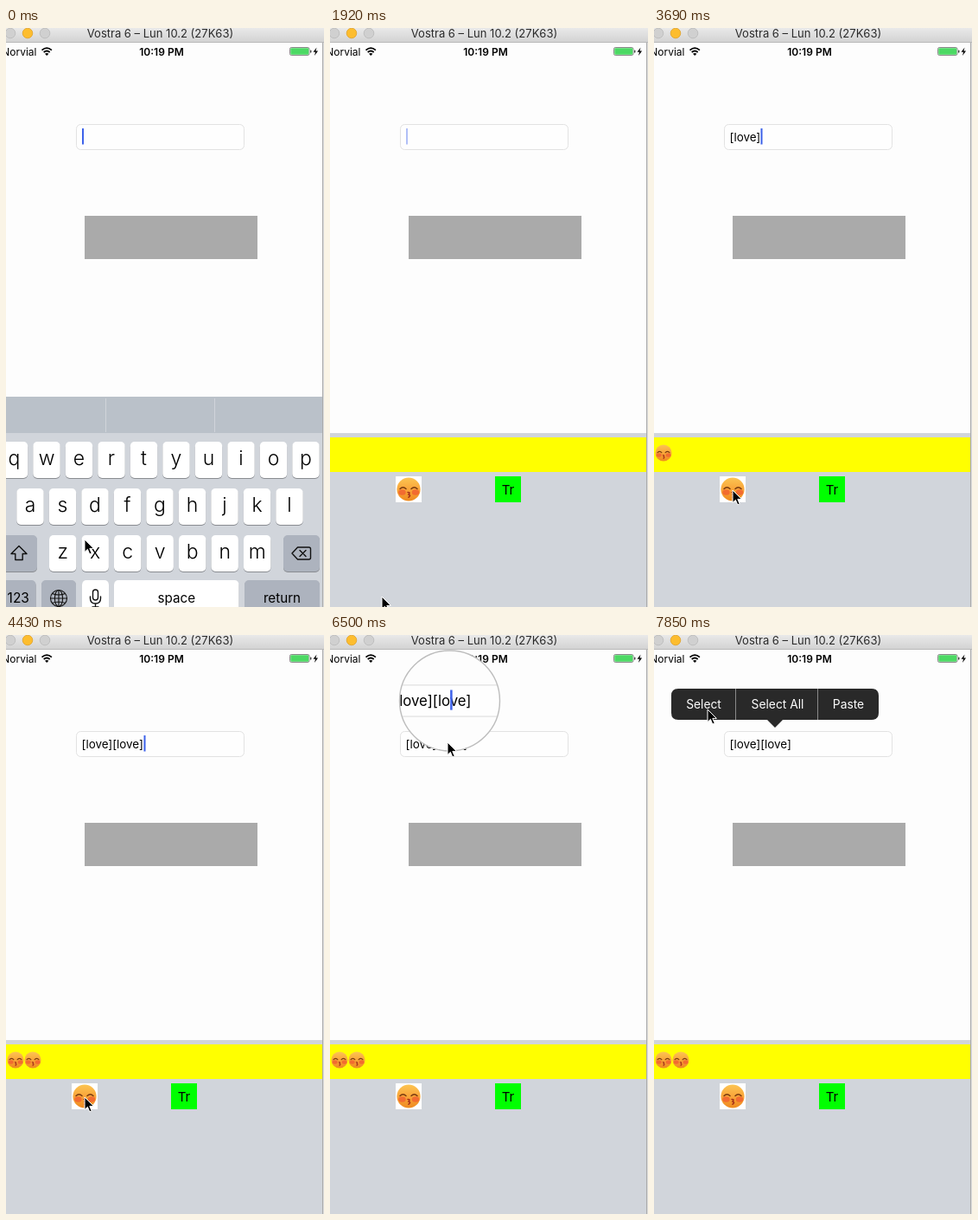
Animation, 368 px wide and 669 px high, one loop 7990 ms. Source, as an HTML page:

```html
<!DOCTYPE html>
<html lang="en">
<head>
<meta charset="utf-8">
<title>Custom keyboard demo</title>
<style>
  html, body { margin: 0; width: 100%; height: 100%; overflow: hidden; background: #fdfdfd; }
  svg { display: block; width: 100%; height: 100%; font-family: Inter, Roboto, sans-serif; }
  .mid { text-anchor: middle; }
  .line { fill: none; stroke: #111; stroke-width: 1.4; stroke-linejoin: round; stroke-linecap: round; }
</style>
</head>
<body>
<svg viewBox="0 0 368 669">
  <defs>
    <linearGradient id="titleFill" x2="0" y2="1">
      <stop stop-color="#e9e9e9"/><stop offset="1" stop-color="#d3d3d3"/>
    </linearGradient>
    <linearGradient id="skin" x2="0" y2="1">
      <stop stop-color="#fcc552"/><stop offset=".5" stop-color="#f9a53a"/><stop offset="1" stop-color="#ee8a1f"/>
    </linearGradient>
    <clipPath id="lens"><circle r="58"/></clipPath>
    <g id="face">
      <circle r="13.6" fill="url(#skin)"/>
      <ellipse cx="-7.5" cy="3.5" rx="4.2" ry="3.2" fill="#f0522f" opacity=".65"/>
      <ellipse cx="8" cy="3.5" rx="4.2" ry="3.2" fill="#f0522f" opacity=".65"/>
      <path d="M-10-.5q3.5-3.5 7 0M3-.5q3.5-3.5 7 0" fill="none" stroke="#7a3b10" stroke-width="1.5" stroke-linecap="round"/>
      <path d="M-1 3.5q3.5 0 1 2.5q3 1 0 3.2" fill="none" stroke="#a5311a" stroke-width="1.6" stroke-linecap="round"/>
    </g>
  </defs>

  <rect width="368" height="669" fill="#fdfdfd"/>
  <rect x="91" y="217" width="200" height="50" fill="#aaa"/>

  <g id="titleBar">
    <rect width="368" height="16" fill="url(#titleFill)"/>
    <rect y="16" width="368" height="1" fill="#b8b8b8"/>
    <g fill="#d0d0d0" stroke="#b9b9b9" stroke-width=".8">
      <circle cx="5" cy="6" r="5.8"/><circle cx="45" cy="6" r="5.8"/>
      <circle cx="25" cy="6" r="5.8" fill="#fdbd2e" stroke="#e0a127"/>
    </g>
    <text class="mid" x="178.5" y="11" font-size="13" fill="#2a2a2a">Vostra 6 – Lun 10.2 (27K63)</text>
  </g>

  <g id="statusBar">
    <text x="35.5" y="31.5" font-size="12" text-anchor="end">Norvial</text>
    <g fill="none" stroke="#000" stroke-width="1.8">
      <path d="M41.5 25.6q5.7-5 11.4 0M43.7 28q3.5-3 7 0"/>
      <path d="M47.2 32l-2.2-2.2q2.2-1.8 4.4 0z" fill="#000" stroke="none"/>
    </g>
    <text class="mid" x="180" y="31.5" font-size="12" font-weight="600">10:19 PM</text>
    <rect x="328.5" y="22.5" width="22.5" height="9" rx="1.8" fill="#fff" stroke="#6a6a6a" stroke-width=".8"/>
    <rect x="329.3" y="23.3" width="21" height="7.4" rx="1" fill="#4cd964"/>
    <rect x="352" y="25.5" width="1.4" height="3.2" rx=".7" fill="#444"/>
    <path d="M359.5 22.5l-4 5.3h2.6l-1.2 4.2 4.2-5.6h-2.7z"/>
  </g>

  <g id="field">
    <rect x="81.5" y="111.5" width="194" height="29" rx="5" fill="#fefefe" stroke="#e2e2e2"/>
    <text id="typed" x="87.5" y="130.5" font-size="13.4"></text>
    <rect id="caret" y="116" width="2" height="18.5" fill="#3d62ea"/>
  </g>

  <g id="letterBoard">
    <rect y="426" width="366" height="42" fill="#bac1c9"/>
    <path d="M115.5 428v39M241.5 428v39" stroke="#d0d4da"/>
    <rect y="468" width="366" height="201" fill="#d1d5db"/>
    <g id="keys"></g>
    <path class="line" d="M15 598.5l9 9h-4.8v7h-8.4v-7H6z"/>
    <path class="line" d="M331 607l6.5-7h13q2 0 2 2v10q0 2-2 2h-13zM340 603.5l7 7M347 603.5l-7 7"/>
    <g class="line">
      <rect x="100.5" y="649" width="6" height="12" rx="3"/>
      <path d="M97.5 657v2q0 6 6 6t6-6v-2M103.5 665v4M100 669h7"/>
    </g>
  </g>

  <g id="emojiBoard">
    <rect y="468" width="366" height="201" fill="#d1d5db"/>
    <rect y="473" width="366" height="40" fill="#ff0"/>
    <use id="sent1" href="#face" transform="translate(11 491) scale(.7)"/>
    <use id="sent2" href="#face" transform="translate(31 491) scale(.7)"/>
    <rect x="76" y="518" width="30" height="30" fill="#fff"/>
    <use href="#face" transform="translate(91 533)"/>
    <rect id="press" x="77" y="519" width="28" height="28" rx="14" fill="#000" opacity=".35"/>
    <rect x="191" y="518" width="30" height="30" fill="#0f0"/>
    <text class="mid" x="206" y="538.5" font-size="15">Tr</text>
  </g>

  <rect x="366" y="17" width="2" height="652" fill="#dedede"/>
  <rect x="366" y="17" width="1" height="652" fill="#a9a9a9"/>

  <g id="menu">
    <path d="M28 62H252q8 0 8 8V90q0 8-8 8H149l-9 9-9-9H28q-8 0-8-8V70q0-8 8-8z" fill="#292929"/>
    <path d="M94.5 62v36M189.5 62v36" stroke="#8a8a8a"/>
    <g id="menuLabels" class="mid" font-size="13.8" fill="#fff">
      <text x="57.5" y="85">Select</text>
      <text x="143" y="85">Select All</text>
      <text x="225" y="85">Paste</text>
    </g>
  </g>

  <g id="loupe">
    <g clip-path="url(#lens)">
      <circle r="58" fill="#fdfdfd"/>
      <use href="#field" transform="scale(1.25) translate(-139 -126)"/>
    </g>
    <circle r="58" fill="none" stroke="#bdbdbd" stroke-width="1.4"/>
  </g>

  <path id="mouse" d="M0 0v14.5l3.4-3.2 2.4 5.6 2.4-1-2.4-5.5h4.6z" stroke="#fff" stroke-width="1"/>
</svg>
<script>
const LOOP = 7990, STEP = 148;
const el = id => document.getElementById(id);
const show = (id, on) => el(id).style.display = on ? '' : 'none';
const linear = p => p, smooth = p => p * p * (3 - 2 * p);

// Value at time t along [time, value] stops.
function track(t, stops, ease = linear) {
  const next = stops.findIndex(s => s[0] > t);
  if (next === 0) return stops[0][1];
  if (next < 0) return stops[stops.length - 1][1];
  const [t0, v0] = stops[next - 1], [t1, v1] = stops[next];
  return v0 + (v1 - v0) * ease((t - t0) / (t1 - t0));
}

function key(x, y, w, label = '', size = 23, fill = '#fff', id = '') {
  const baseline = y + (size > 20 ? 27 : 26);
  return `<g id="${id}"><rect x="${x}" y="${y + 1}" width="${w}" height="42" rx="5" fill="#898c91"/>
    <rect x="${x}" y="${y}" width="${w}" height="42" rx="5" fill="${fill}"/>
    <text class="mid" x="${x + w / 2}" y="${baseline}" font-size="${size}" font-weight="${size > 20 ? 300 : 400}">${label}</text></g>`;
}

function buildKeys() {
  const dark = '#adb3be';
  const rows = [['qwertyuiop', 9.5, 478], ['asdfghjkl', 28, 532], ['zxcvbnm', 65.7, 586]];
  let html = rows.map(([letters, center, y]) =>
    [...letters].map((c, i) => key(center + i * 37.5 - 15.7, y, 31.4, c)).join('')).join('');
  html += key(-6, 586, 42, '', 15, dark) + key(321, 586, 42, '', 15, dark)
    + key(-6, 638, 40.5, '123', 15.5, dark) + key(41, 638, 40, '', 15, dark, 'globeKey')
    + key(88, 638, 31, '', 15) + key(125, 638, 144.5, 'space', 15.2)
    + key(276, 638, 87, 'return', 15.2, dark);
  el('keys').innerHTML = html;
  el('globeKey').insertAdjacentHTML('beforeend', `<g class="line" style="stroke-width:1.1">
    <circle cx="61" cy="659" r="9.5"/><ellipse cx="61" cy="659" rx="4.6" ry="9.5"/>
    <path d="M61 649.5v19M51.5 659h19M53.5 653.5q7.5 3 15 0M53.5 664.5q7.5-3 15 0"/></g>`);
}

const caretFade = [[380, 1], [560, 0], [700, 0], [880, 1], [1400, 1], [1620, .08], [1850, .08], [2060, 1],
  [2300, 1], [2500, 0], [2800, 0], [2960, 1], [4900, 1], [5060, 0], [5300, 0], [5480, 1],
  [5640, 1], [5920, 0], [6150, 0], [6210, 1], [7500, 1], [7700, 0]];
const mouseX = [[100, 91], [620, 60], [2360, 60], [3060, 91], [4700, 91], [5250, 154], [5600, 136], [7400, 136], [7840, 62]];
const mouseY = [[100, 591], [620, 657], [2360, 657], [3060, 534], [4700, 534], [5600, 124], [7400, 124], [7840, 86]];
const loupeScale = [[6150, .15], [6500, 1], [6820, 1], [6983, 0]];
const loupeY = [[6150, 105], [6500, 76], [6820, 76], [6970, 64]];

function draw(t) {
  const count = (t >= 3540) + (t >= 4280);
  const selecting = t >= 6200;
  show('letterBoard', t < 1920);
  show('emojiBoard', t >= 1920);
  show('globeKey', t < 730);
  show('sent1', count > 0);
  show('sent2', count > 1);
  show('press', (t >= 3400 && t < 3540) || (t >= 4140 && t < 4280));

  el('typed').textContent = '[love]'.repeat(count);
  el('caret').setAttribute('x', selecting ? 139.5 : [88, 123.5, 159.5][count]);
  el('caret').setAttribute('opacity', track(t, caretFade));

  const menuFade = track(t, [[6870, 0], [7020, 1]]);
  el('menu').setAttribute('opacity', menuFade);
  el('menuLabels').setAttribute('opacity', menuFade);

  show('loupe', selecting && t < 6983);
  el('loupe').setAttribute('transform', `translate(138.5 ${track(t, loupeY)}) scale(${track(t, loupeScale)})`);
  el('mouse').setAttribute('transform', `translate(${track(t, mouseX, smooth)} ${track(t, mouseY, smooth)})`);
}

function tick() {
  const t = performance.now() % LOOP;
  draw(Math.floor(t / STEP + .12) * STEP);
  requestAnimationFrame(tick);
}

buildKeys();
tick();
</script>
</body>
</html>
```
